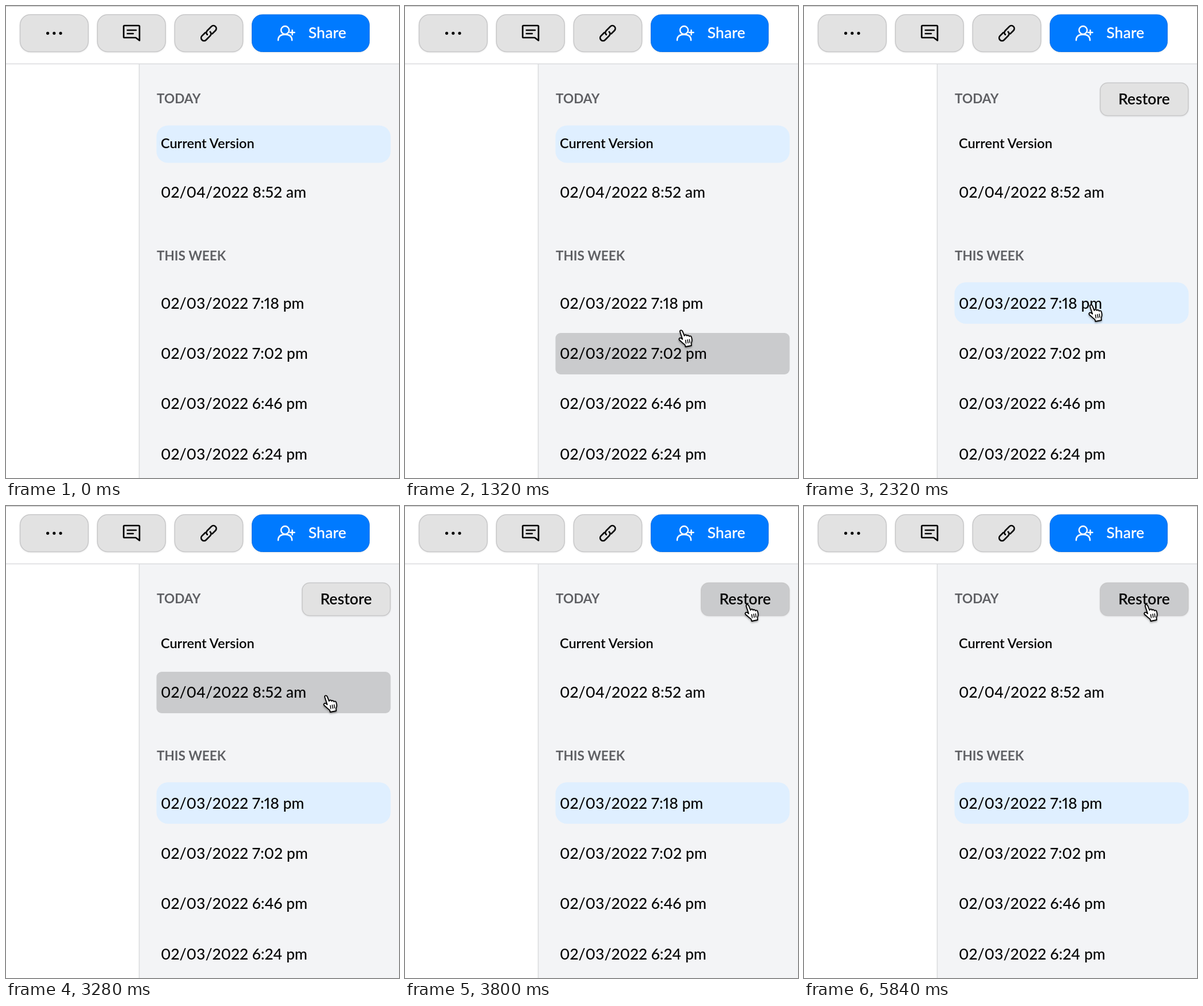
Write an HTML page that moves like this. It is 683x820 px and loops after 5.92 s.

```html
<!DOCTYPE html>
<html lang="en">
<head>
<meta charset="utf-8">
<title>Version history</title>
<style>
  html, body { margin: 0; width: 100%; height: 100%; overflow: hidden; background: #fff; }
  svg { display: block; }
  text { font-family: Lato, "Open Sans", sans-serif; font-size: 26.5px; font-weight: 500; font-variant-numeric: proportional-nums; fill: #050505; }
  .head { font-size: 22.5px; font-weight: 700; fill: #5f6064; }
  .name { font-size: 23.5px; font-weight: 600; }
  .action { font-size: 26.5px; font-weight: 600; text-anchor: middle; }
  .button { fill: #e2e2e2; stroke: #c8c8c9; stroke-width: 1.5; }
  .icon { fill: none; stroke: #050505; stroke-width: 2.7; stroke-linecap: round; stroke-linejoin: round; }
  .light { stroke: #fff; stroke-width: 2.4; }
  .raised { filter: drop-shadow(0 1px 1px rgba(0, 0, 0, .08)); }
  .pointer { filter: drop-shadow(0 2px 1.5px rgba(0, 0, 0, .35)); stroke-linejoin: round; stroke-linecap: round; }
</style>
</head>
<body>
<svg width="683" height="820" viewBox="0 0 683 820">
  <rect width="683" height="820" fill="#fff"/>
  <rect width="683" height="1" fill="#c3c3c4"/>
  <rect x="231" y="101" width="452" height="719" fill="#f3f4f6"/>
  <path d="M0 100.5H683M231.5 101V820" stroke="#dadbdd" stroke-width="1.5"/>

  <g class="raised">
    <rect class="button" x="24.5" y="15" width="118.500" height="64.5" rx="18"/>
    <rect class="button" x="158.8" y="15" width="118.5" height="64.5" rx="18"/>
    <rect class="button" x="293.2" y="15" width="118.5" height="64.5" rx="18"/>
    <rect x="427.5" y="15" width="204" height="64.5" rx="18" fill="#007aff" stroke="#0a70e4"/>
  </g>
  <path d="M72.5 47.3h0M83.7 47.3h0M94.9 47.3h0" class="icon" style="stroke-width:5.2"/>
  <path class="icon" d="M206 34H230.5Q232 34 232 35.5V60L225.5 55H206Q204.5 55 204.5 53.5V35.5Q204.5 34 206 34ZM211 42H226M211 48H221"/>
  <g class="icon" transform="translate(352.3 47.3) rotate(-45)">
    <path id="link" d="M-3.5-5H-11.500a5 5 0 0 0 0 10H-1.500A5 5 0 0 0 3.500 0"/>
    <use href="#link" transform="rotate(180)"/>
  </g>
  <g class="icon light">
    <circle cx="485" cy="42" r="7"/>
    <path d="M473 59.5C473 53 477.5 49.5 485 49.5S497 53 497 59.5M493.5 46H501.5M497.5 42V50"/>
  </g>
  <text class="action" x="558.5" y="56" style="fill:#fff">Share</text>

  <g id="marks"></g>
  <g id="restore">
    <rect id="restoreBox" class="button raised" x="514.8" y="133.5" width="153" height="57" rx="13"/>
    <text class="action" x="591" y="171">Restore</text>
  </g>

  <text class="head" x="262" y="169">TODAY</text>
  <text class="head" x="262" y="442">THIS WEEK</text>
  <g id="labels"></g>

  <g id="arrow" class="pointer">
    <path d="M0 0V26L5.8 20.5L10 30.5L14.5 28.6L10.3 18.8H18.5Z" fill="#000" stroke="#fff" stroke-width="1.8"/>
  </g>
  <g id="hand" class="pointer" stroke="#000" stroke-width="1.8">
    <path fill="#fff" d="M3 4C2 1 6 .2 7.3 3.2L10.5 11C11 8.6 14 8.7 15 11C15.5 9.4 18.3 9.7 19 12C20 10.7 22.4 11.3 23 13.7C24.2 18 24.3 20.5 22.5 23.5L22.8 28L12.5 30L11.5 26.5C8 24.5 5.8 21.5 2.5 19C0 16.7 2 13.7 5 15L7.3 17Z"/>
    <path fill="none" stroke-width="1.5" d="M12.5 18.5L13.5 24M16 17.8L17 23.5M19.3 17.2L20 22.8"/>
  </g>
</svg>
<script>
const LOOP = 5920, STEP = 40, SELECT = 1760;
const SVG = "http://www.w3.org/2000/svg";
const byId = id => document.getElementById(id);

// label, top, height, baseline
const rows = [
  ["Current Version", 207.5, 65, 247],
  ["02/04/2022 8:52 am", 288, 72, 333],
  ["02/03/2022 7:18 pm", 480, 72, 525.5],
  ["02/03/2022 7:02 pm", 568, 72, 613],
  ["02/03/2022 6:46 pm", 655, 72, 700],
  ["02/03/2022 6:24 pm", 742.5, 72, 787.5]
];
const CURRENT = 0, PICKED = 2;

// time, x, y of the pointer's hot spot
const path = [
  [560, 406, 840], [640, 430, 757], [720, 449, 677], [760, 459, 641],
  [800, 468, 606], [840, 474, 588], [1280, 474, 588], [1320, 480, 569],
  [1400, 490, 543], [1480, 497, 528], [1560, 499, 525], [3080, 499, 525],
  [3120, 503, 506], [3200, 530, 416], [3240, 545, 372], [3280, 556, 335],
  [3360, 571, 273], [3440, 583, 224], [3520, 591, 191], [3600, 594, 179],
  [3680, 595, 177], [LOOP, 595, 177]
];

function add(parent, tag, attrs) {
  const el = document.createElementNS(SVG, tag);
  for (const key in attrs) el.setAttribute(key, attrs[key]);
  return byId(parent).appendChild(el);
}

const marks = rows.map(([label, top, height, baseline], i) => {
  add("labels", "text", { x: 269, y: baseline, class: i === CURRENT ? "name" : "" }).textContent = label;
  return add("marks", "rect", { x: 261.5, y: top, width: 407, height });
});

function pointAt(t) {
  const next = path.findIndex(p => p[0] > t);
  if (next < 1) return { x: path[0][1], y: path[0][2] };
  const a = path[next - 1], b = path[next];
  const k = (t - a[0]) / (b[0] - a[0]);
  return { x: a[1] + (b[1] - a[1]) * k, y: a[2] + (b[2] - a[2]) * k };
}

const rowAt = y => rows.findIndex(([, top, height]) => y >= top && y <= top + height);
const onRestore = (p, t) => t >= SELECT && p.x > 514 && p.y > 133 && p.y < 191;

function place(id, x, y, shown) {
  byId(id).setAttribute("transform", `translate(${x} ${y})`);
  byId(id).style.display = shown ? "" : "none";
}

function draw(t) {
  const p = pointAt(t);
  const live = rowAt(p.y);
  const overButton = onRestore(p, t);
  // the highlight lingers one step after the pointer leaves a row
  const hovered = live >= 0 ? live : rowAt(pointAt(t - STEP).y);
  const selected = t >= SELECT ? PICKED : CURRENT;

  marks.forEach((mark, i) => {
    const chosen = i === selected;
    mark.setAttribute("fill", chosen ? "#dfefff" : i === hovered ? "#cacbcd" : "none");
    mark.setAttribute("rx", chosen ? 20 : 9);
  });

  byId("restore").style.display = t >= SELECT ? "" : "none";
  byId("restoreBox").style.fill = overButton ? "#cacbcd" : "";

  const isHand = live >= 0 || overButton;
  place("hand", p.x - 5, p.y - 7, isHand);
  place("arrow", p.x, p.y, !isHand);
}

function tick() {
  const t = performance.now() % LOOP;
  draw(Math.floor(t / STEP) * STEP);
  requestAnimationFrame(tick);
}
tick();
</script>
</body>
</html>
```
